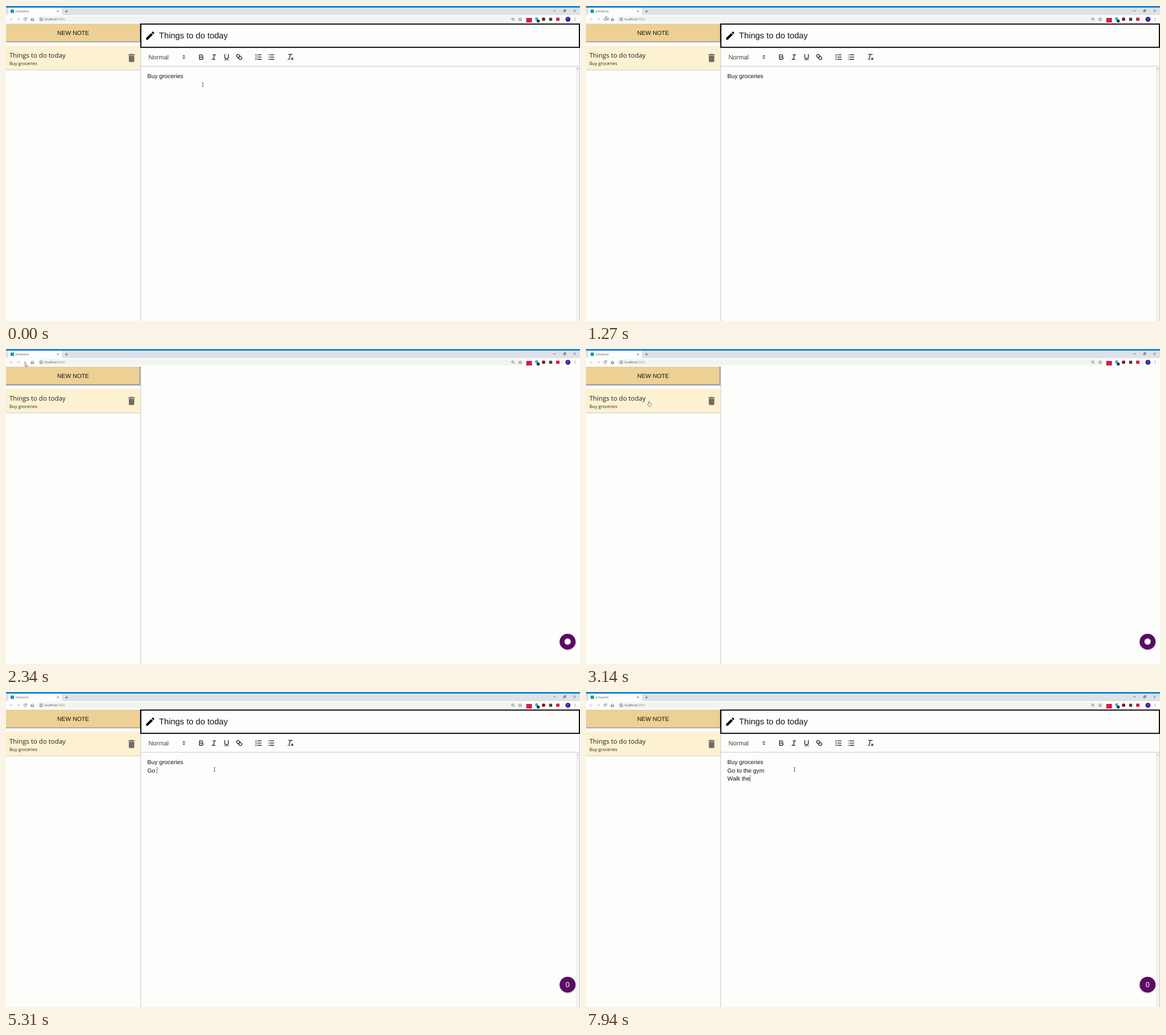
Recreate the animation shown at these times as an HTML page. Size 1009 by 555 pixels, loop 8 s.

```html
<!DOCTYPE html>
<html lang="en">
<head>
<meta charset="utf-8">
<title>Notes</title>
<style>
html, body { margin: 0; width: 100%; height: 100%; overflow: hidden; background: #fdfdfb; }
svg { display: block; width: 1009px; height: 555px; }
text { font-family: "Liberation Sans", Arial, sans-serif; white-space: pre; text-rendering: geometricPrecision; }
.ui { font-family: "Open Sans", "Noto Sans", sans-serif; }
.mid { text-anchor: middle; }
.line { fill: none; stroke: #5f6368; stroke-width: .9; }
.tool { fill: none; stroke: #444; stroke-width: 2; stroke-linecap: round; stroke-linejoin: round; }
.thin { stroke-width: 1; }
</style>
</head>
<body>
<svg viewBox="0 0 1009 555">
  <!-- browser frame -->
  <rect width="1009" height="16" y="2" fill="#dee1e6"/>
  <rect width="1009" height="3" fill="#1b87d6"/>
  <rect y="16" width="1009" height="15" fill="#fdfdfd"/>
  <path d="M1 16.5Q4 16 4 13V5.500Q4 3 6.500 3H96Q98 3 98 5.500V13Q98 16 101 16.500Z" fill="#fdfdfd"/>
  <g id="favicon"></g>
  <text class="ui" x="17" y="11.300" font-size="5.100" fill="#555">Jottapane</text>
  <path class="line" stroke="#333" d="M89.800 7.800l3 3m0-3l-3 3M106.300 7v5m-2.500-2.500h5"/>
  <path class="line" d="M962 8.500h4M980.200 7.800h2.600v2.600h-2.600zM981.200 7.500v-1h2.700v2.800h-1M997.500 6.500l4 4m0-4l-4 4" stroke-width=".7"/>
  <path class="line" style="stroke:#c3c5c8" d="M12 23.300H6.800m2.300-2.300l-2.300 2.300 2.300 2.300M19 23.300h5.200m-2.300-2.300l2.300 2.300-2.300 2.300"/>
  <path id="reload" class="line" d="M36 21.900A2.400 2.400 0 1 0 36.100 24.300M36.300 20.500v2h-2"/>
  <path id="stop" class="line" d="M31.700 21.200l4.200 4.200m0-4.200l-4.200 4.200"/>
  <path class="line" d="M43.400 23.600l3-2.700 3 2.700M44.300 23v2.800h1.500v-1.600h1.200v1.600h1.500V23"/>
  <rect x="55" y="18" width="855" height="10.800" rx="5.400" fill="#f1f4f0"/>
  <g class="line" stroke-width=".7"><circle cx="62" cy="23.300" r="2.500"/><path d="M62 23v1.700m0-2.900v.5"/></g>
  <text class="ui" x="68" y="25.300" font-size="5.250" fill="#444">localhost<tspan fill="#888">:3000</tspan></text>
  <g class="line"><circle cx="890.600" cy="22.800" r="1.700"/><path d="M892 24.200l1.700 1.700"/>
    <path d="M903.700 20.600l.8 1.900 2 .2-1.500 1.300.5 2-1.800-1.100-1.800 1.100.5-2-1.500-1.300 2-.2z" stroke-width=".7"/></g>
  <rect x="914.500" y="21" width="10" height="8" fill="#d81b46"/>
  <circle cx="932.800" cy="22.600" r="2.800" fill="#36b9cf"/>
  <rect x="933" y="24" width="5" height="5" rx="1" fill="#2b3a4a"/>
  <circle cx="945" cy="23.300" r="3" fill="#851522"/>
  <rect x="954.700" y="20.700" width="5.400" height="5.400" fill="#444"/>
  <rect x="967" y="20.500" width="6" height="5.600" fill="#d8223c"/>
  <path d="M978.500 19v9" stroke="#dadce0" stroke-width=".8"/>
  <circle cx="987.800" cy="23.300" r="4.400" fill="#38209b"/>
  <text class="mid" x="987.800" y="25" font-size="4.800" fill="#ddd">T</text>
  <path d="M1000.300 20.700v1m0 1.100v1m0 1.100v1" stroke="#5f6368" stroke-width="1.100"/>

  <!-- sidebar -->
  <rect y="31" width="236" height="33" fill="#edd094"/>
  <path d="M.5 63V31.500H236" fill="none" stroke="#e2d6b8"/>
  <path id="buttonEdge" d="M0 63.200H235.700V31" fill="none" stroke="#8c90ad"/>
  <text class="mid" x="118" y="51.100" font-size="10.400" fill="#111">NEW NOTE</text>
  <rect y="70" width="236.500" height="42.500" fill="#fcf2d1"/>
  <path d="M0 112.700H236.500" stroke="#c9c9c9"/>
  <text class="ui" x="6" y="91.300" font-size="11.450" fill="#222">Things to do today</text>
  <text class="ui" x="6" y="104.200" font-size="7.750" fill="#222">Buy groceries</text>
  <path transform="translate(211.100 81.900) scale(.8)" fill="#716d60" d="M6 19c0 1.100.9 2 2 2h8c1.100 0 2-.9 2-2V7H6v12zM19 4h-3.500l-1-1h-5l-1 1H5v2h14V4z"/>
  <path d="M236.800 31V555" stroke="#c6c6c8"/>

  <!-- editor -->
  <g id="editor">
    <path d="M236.800 106.200H1008.500M1008.500 73V555" fill="none" stroke="#c9c9cb"/>
    <rect x="1001.700" y="107" width="6.300" height="448" fill="#f1f1f1"/>
    <path d="M1003.300 111.200l1.700-2 1.700 2z" fill="#999"/>
    <rect x="237" y="31.800" width="771" height="41" fill="#fdfdfc" stroke="#0b0b10" stroke-width="2"/>
    <path transform="translate(243.900 42.700) scale(.8)" fill="#000" d="M3 17.250V21h3.750L17.810 9.940l-3.750-3.750L3 17.250zM20.710 7.040c.39-.39.39-1.020 0-1.410l-2.340-2.340c-.39-.39-1.020-.39-1.410 0l-1.830 1.830 3.750 3.750 1.830-1.830z"/>
    <text x="269" y="57.400" font-size="14.700" fill="#111">Things to do today</text>
    <text x="250.400" y="93.700" font-size="11.050" fill="#444">Normal</text>
    <g id="tools" class="tool"></g>
    <g id="lines" font-size="10.300" fill="#111"></g>
    <rect id="caret" width="1" height="12" fill="#777"/>
  </g>

  <g id="badge">
    <circle cx="987.300" cy="517.500" r="14.800" fill="#000" opacity=".1"/>
    <circle cx="987.200" cy="515.700" r="14" fill="#5a0b62"/>
    <circle id="mark" cx="987.200" cy="515.500" r="5.500" fill="#fff"/>
    <text id="count" class="mid" x="987.200" y="520" font-size="13" fill="#fff">0</text>
  </g>
  <path id="pointer" stroke-linejoin="round"/>
</svg>
<script>
const $ = id => document.getElementById(id);
const show = (id, on) => $(id).setAttribute('visibility', on ? 'inherit' : 'hidden');
const set = (id, attrs) => { for (const k in attrs) $(id).setAttribute(k, attrs[k]); };

// Toolbar icons on an 18-unit grid: centre x, heavy strokes, thin strokes
const icons = [
  [312.600, '', 'M7 11l2 2 2-2zM7 7l2-2 2 2z'],
  [343.300, 'M5 4H9.500a2.500 2.500 0 0 1 0 5H5zM5 9h5.500a2.500 2.500 0 0 1 0 5H5z', ''],
  [365.500, 'M7 4h6M5 14h6M8 14L10 4', ''],
  [387.700, 'M5 3V9a4 4 0 0 0 8 0V3', 'M3.500 15.500h11'],
  [409.900, 'M7 11l4-4M8.900 4.600a3.500 3.500 0 0 1 .4 4.700A3.500 3.500 0 0 1 4.600 8.900C3.200 7.500 2 6.400 4.200 4.200S7.500 3.200 8.900 4.600zM13.400 9.100a3.500 3.500 0 0 0-4.700-.4 3.500 3.500 0 0 0 .4 4.700c1.400 1.400 2.500 2.500 4.700.4s1-3.300-.4-4.700z', ''],
  [443.900, 'M7 4h8M7 9h8M7 14h8', 'M2.500 3l1-.5v3m-1 0h2M2.500 8q2-1 1.700.5L2.500 10.500h2M2.500 12.700h1.700l-1 1.200q1.500.2.8 1.400-.5.500-1.700.2'],
  [466.100, 'M6 4h9M6 9h9M6 14h9M3 4h0M3 9h0M3 14h0', ''],
  [500, 'M5 3h8M6 13L9 3M11.500 11.500l3 3m0-3l-3 3', 'M2.500 14.500h6'],
];
$('tools').innerHTML = icons.map(([x, heavy, thin]) =>
  `<g transform="translate(${x - 7.15} 82.800) scale(.794)"><path d="${heavy}"/>` +
  `<path class="thin" d="${thin}" ${x < 320 ? 'fill="#444"' : ''}/></g>`).join('');

const LOOP = 8000, RELOADED = 2280, OPENED = 3400, CLICKED = 4040;
const LEFT = 248.6, LEADING = 14.6;

// Pointer stops: time, x, y
const stops = [[0, 346, 138.5], [690, 37, 13], [1000, 37, 13], [1600, 33.5, 24.500],
  [2540, 33.5, 24.500], [3140, 110, 92], [3670, 110, 92], [4020, 366.500, 136.500], [LOOP, 366.500, 136.500]];
const shapes = {
  arrow: ['M0 0V6.300L1.500 5 2.600 7.300 3.600 6.800 2.600 4.600H4.600Z', '#fff', '#444', .6],
  hand: ['M0 .5Q.8-.3 1.500.5V3.500L5 4.300V6.500L4 9H.8L-2 5.300Q-1.500 4.300 0 5.500Z', '#fff', '#333', .6],
  beam: ['M-1.600-3.500H-.4L0-3 .4-3.500H1.600M0-3V3M-1.600 3.500H-.4L0 3 .4 3.500H1.600', 'none', '#444', .8],
};

const typed = '\nGo to the gym\nWalk the';
const keyTimes = [4770, 5040, 5240, 5310, 5740, 5860, 5960, 6080, 6200, 6320, 6420, 6570,
  6680, 6800, 7040, 7310, 7470, 7550, 7630, 7700, 7780, 7860, 7930];

function drawPointer(t) {
  const i = stops.findIndex(s => s[0] > t);
  const [t0, x0, y0] = stops[i - 1], [t1, x1, y1] = stops[i];
  const p = (t - t0) / (t1 - t0), e = p * p * (3 - 2 * p);
  const x = x0 + (x1 - x0) * e, y = y0 + (y1 - y0) * e;
  const [d, fill, stroke, width] = shapes[y < 31 ? 'arrow' : x < 236 ? 'hand' : 'beam'];
  set('pointer', { d, fill, stroke, 'stroke-width': width, transform: `translate(${x} ${y})` });
}

let shownText;
function drawText(t) {
  const keys = keyTimes.filter(k => k <= t);
  const text = 'Buy groceries' + typed.slice(0, keys.length);
  if (text !== shownText) {
    shownText = text;
    const rows = text.split('\n');
    $('lines').innerHTML = rows.map((row, i) =>
      `<text x="${LEFT}" y="${126.9 + i * LEADING}">${row}</text>`).join('');
    const width = $('lines').lastChild.getComputedTextLength();
    set('caret', { x: Math.floor(LEFT + width), y: Math.round(117 + (rows.length - 1) * LEADING) });
  }
  const lastInput = keys.length ? keys[keys.length - 1] : CLICKED;
  show('caret', t < RELOADED ? t >= 1700 : t >= CLICKED && (t - lastInput) % 1060 < 530);
}

function draw(t) {
  const loading = t >= 1850 && t < 2500, open = t < RELOADED || t >= OPENED;
  show('reload', !loading);
  show('stop', loading);
  set('stop', { opacity: t < RELOADED ? 1 : .55 });
  $('favicon').innerHTML = loading && t < RELOADED
    ? `<circle cx="11" cy="9.300" r="1.900" fill="#159aa5"/><circle cx="11" cy="9.300" r="2.800" fill="none" stroke="#3b7fd0" stroke-width=".7" stroke-dasharray="11 7" transform="rotate(${t * .4} 11 9.300)"/>`
    : '<rect x="8" y="6.300" width="6" height="6" rx="1" fill="#159aa5"/>';
  set('buttonEdge', { 'stroke-width': open ? 1.3 : 2 });
  show('editor', open);
  show('badge', t >= RELOADED);
  show('mark', t >= RELOADED && t < OPENED);
  show('count', t >= OPENED);
  drawText(t);
  if (!open) show('caret', false);
  drawPointer(t);
}

const start = performance.now();
(function tick() {
  draw((performance.now() - start) % LOOP);
  requestAnimationFrame(tick);
})();
</script>
</body>
</html>
```
